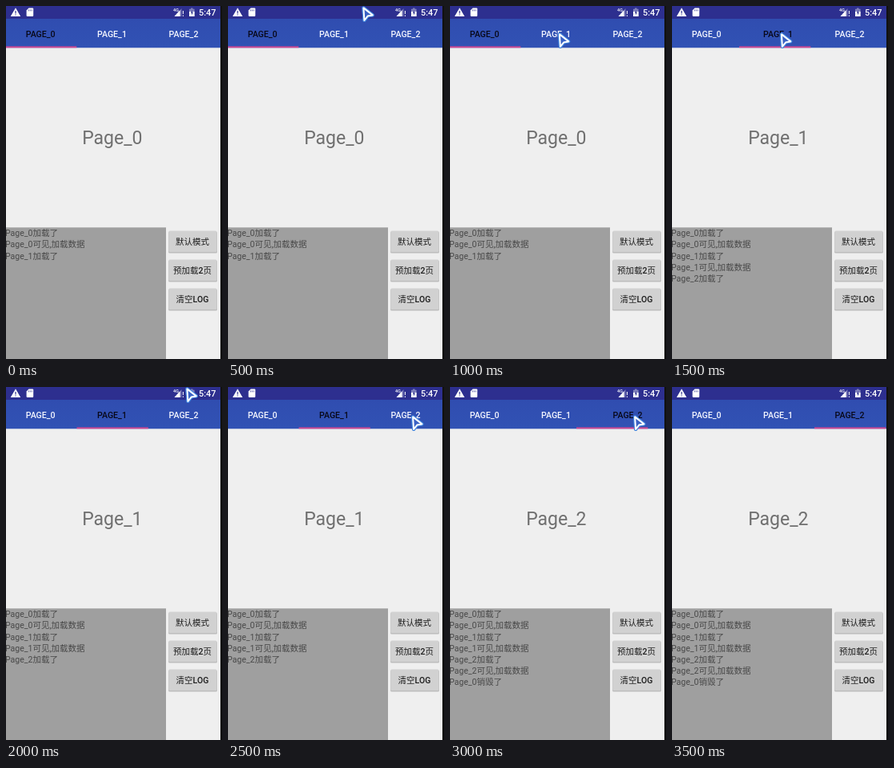
An HTML page for the animation above (4 s loop, 270 by 442 pixels).

```html
<!DOCTYPE html>
<html lang="zh-CN">
<head>
<meta charset="utf-8">
<style>
html, body { margin: 0; width: 100%; height: 100%; overflow: hidden; background: #efefef; }
svg { display: block; width: 100%; height: 100%; font: 10.5px Roboto, "Noto Sans CJK SC", sans-serif; }
.mid { text-anchor: middle; }
.bold { font-weight: 500; }
</style>
</head>
<body>
<svg viewBox="0 0 270 442">
  <defs>
    <linearGradient id="bar" x2="0" y2="1">
      <stop offset="0" stop-color="#304db0"/>
      <stop offset="1" stop-color="#3152b4"/>
    </linearGradient>
  </defs>
  <rect width="270" height="442" fill="#efefef"/>
  <rect width="268" height="16" fill="#2d2f8f"/>
  <rect y="16" width="268" height="36.3" fill="url(#bar)"/>

  <g fill="#fff">
    <path d="M12 2.2 18.2 13H5.8Z"/>
    <path d="M11.4 6h1.2v3.4h-1.2zM11.4 10.4h1.2v1.2h-1.2z" fill="#2d2f8f"/>
    <path d="M28.5 2.5H33.2Q34.2 2.5 34.2 3.5V12Q34.2 13 33.2 13H26.6Q25.6 13 25.6 12V5.4Z"/>
    <path d="M28.4 4.4v2M30.3 4.4v2M32.2 4.4v2" stroke="#2d2f8f" stroke-width=".7"/>
    <text x="209" y="6.5" font-size="5.5" class="bold">4G</text>
    <path d="M219.5 3V13H210.5Z" opacity=".35"/>
    <path d="M217.5 5.2V13H210.5Z"/>
    <path d="M221.4 6v4M221.4 11.5v1.5" stroke="#fff"/>
    <path d="M231 2.5h2.6v1.2h2V13h-6.6V3.7h2Z" opacity=".4"/>
    <path d="M229 7h6.6v6h-6.6Z"/>
    <path d="M232.8 5 230.8 8.8H232.1V11.6L234 7.8H232.8Z" fill="#2d2f8f"/>
    <text x="241" y="12" font-size="10.9" class="bold">5:47</text>
  </g>

  <g id="tabs" class="mid bold" font-size="10.6">
    <text x="43.2" y="38.8">PAGE_0</text>
    <text x="132.5" y="38.8">PAGE_1</text>
    <text x="222" y="38.8">PAGE_2</text>
  </g>
  <rect id="marker" y="50.5" width="89.3" height="1.8" fill="#d9488f"/>
  <text id="title" class="mid" x="132.8" y="173.2" font-size="23" fill="#707070"></text>

  <rect y="277.3" width="200" height="164.7" fill="#9f9f9f"/>
  <g id="log" fill="#484848"></g>
  <g id="buttons" class="mid bold" fill="#1c1c1c"></g>
  <rect x="268" width="2" height="442" fill="#111"/>
  <g id="cursor" stroke-linejoin="round">
    <path id="arrow" d="M2.4 2.4 13.8 11.4 7.6 12.6 3.4 18Z" fill="none" stroke="#3f83dc" stroke-width="4"/>
    <use href="#arrow"/>
    <path d="M2.4 2.4 13.8 11.4 7.6 12.6 3.4 18Z" fill="#3a62c4" stroke="#fff" stroke-width="2"/>
  </g>
</svg>
<script>
const $ = id => document.getElementById(id);
const LOOP = 4000, STEP = 500;
const LINES = ["Page_0加载了", "Page_0可见,加载数据", "Page_1加载了", "Page_1可见,加载数据",
  "Page_2加载了", "Page_2可见,加载数据", "Page_0销毁了"];
const LINES_SHOWN = [3, 5, 7];

// One pose per half second: current page, tab marker x, cursor position
const POSES = [
  { page: 0, marker: -1 },
  { page: 0, marker: -1, cursor: [167, 0] },
  { page: 0, marker: -1, cursor: [134.5, 33] },
  { page: 1, marker: 84, cursor: [134.5, 33] },
  { page: 1, marker: 88.5, cursor: [224, 0] },
  { page: 1, marker: 88.5, cursor: [228.7, 35] },
  { page: 2, marker: 158, cursor: [228.7, 35] },
  { page: 2, marker: 178 },
];

$("log").innerHTML = LINES.map((line, i) =>
  `<text x="-1" y="${288.2 + i * 14.2}">${line}</text>`).join("");
$("buttons").innerHTML = ["默认模式", "预加载2页", "清空LOG"].map((label, i) => {
  const y = 281.5 + i * 36;
  return `<rect x="203" y="${y + 1}" width="61" height="27" rx="1.5" fill="#bdbdbd"/>
    <rect x="203.3" y="${y}" width="60.2" height="26.5" rx="1.5" fill="#d1d1d1"/>
    <text x="233" y="${y + 17.2}">${label}</text>`;
}).join("");

function draw(now) {
  const { page, marker, cursor } = POSES[Math.floor(now % LOOP / STEP)];
  [...$("tabs").children].forEach((tab, i) => tab.setAttribute("fill", i === page ? "#080818" : "#f4f6ff"));
  [...$("log").children].forEach((line, i) => line.style.display = i < LINES_SHOWN[page] ? "" : "none");
  $("title").textContent = "Page_" + page;
  $("marker").setAttribute("x", marker);
  $("cursor").style.display = cursor ? "" : "none";
  if (cursor) $("cursor").setAttribute("transform", `translate(${cursor})`);
  requestAnimationFrame(draw);
}
requestAnimationFrame(draw);
</script>
</body>
</html>
```
